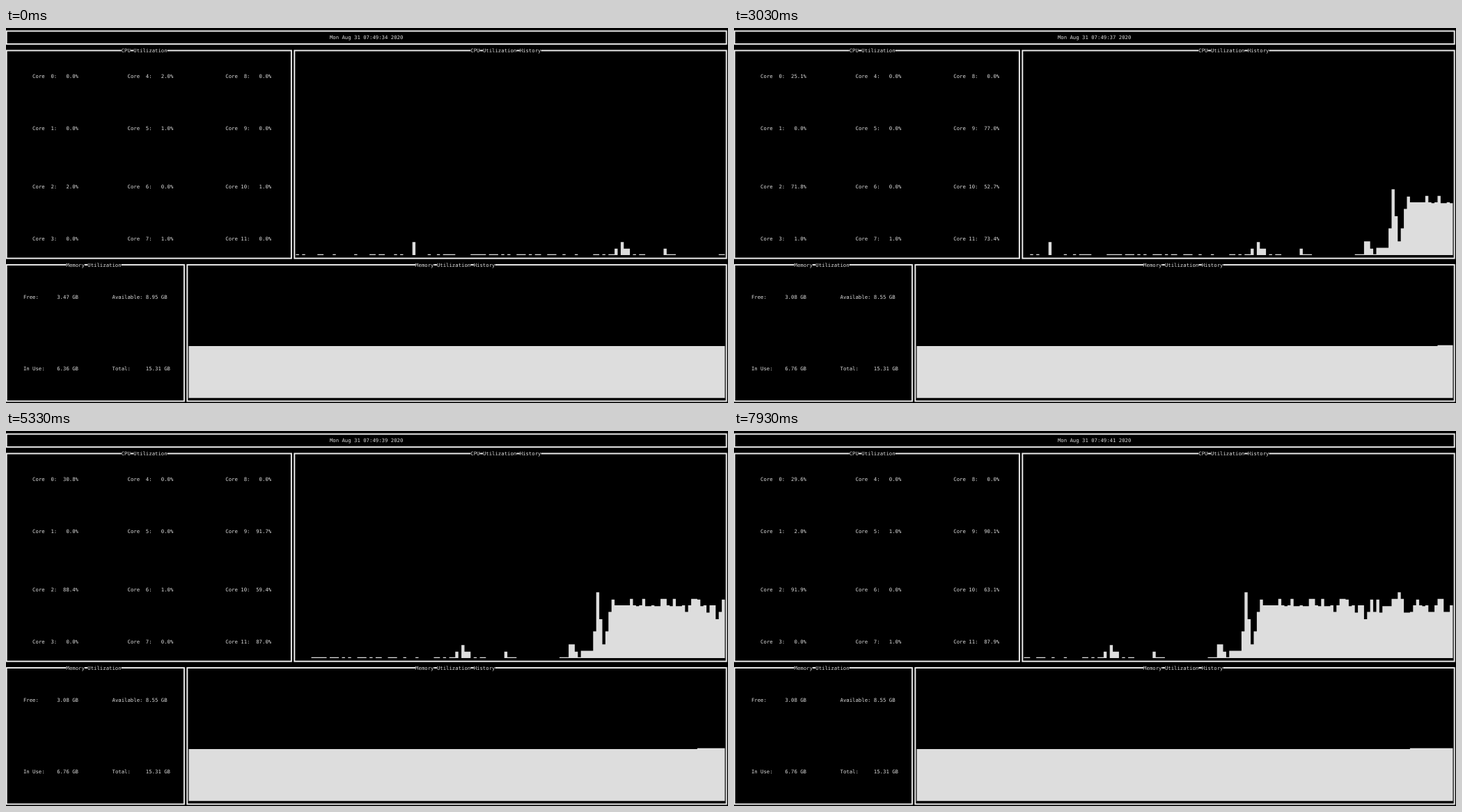
An HTML page for the animation above (8000 ms loop, 1037 px wide and 540 px high).

```html
<!DOCTYPE html>
<html lang="en">
<head>
<meta charset="utf-8">
<title>System monitor</title>
<style>
  html, body { margin: 0; width: 100%; height: 100%; overflow: hidden; background: #000; }
  svg { display: block; width: 1037px; height: 540px; }
  text {
    font: 7.309px "DejaVu Sans Mono", monospace;
    fill: #ddd; white-space: pre; text-rendering: geometricPrecision;
  }
  .border { fill: none; stroke: #e8e8e8; stroke-width: 2; }
  .bars { fill: #ddd; }
</style>
</head>
<body>
<svg id="stage" viewBox="0 0 1037 540"></svg>
<script>
const LOOP = 8000;
const SAMPLE_MS = 100.65;
const STALL = { from: 930, to: 1330 };   // the screen does not refresh here
const CELL_W = 4.4, CELL_H = 9.35;
const LAST_COL = 235, CPU_COL = 95, MEM_COL = 60;
const stage = document.getElementById("stage");

// The terminal grid is slightly cropped at the top left.
const colX = col => col * CELL_W - 1.5;
const rowY = row => row * CELL_H - 0.25;

function random(n, seed = 0) {
  const value = Math.sin(n * 12.9898 + seed * 78.233) * 43758.5453;
  return value - Math.floor(value);
}

function add(tag, attrs, content = "") {
  const node = document.createElementNS("http://www.w3.org/2000/svg", tag);
  for (const key in attrs) node.setAttribute(key, attrs[key]);
  node.textContent = content;
  return stage.appendChild(node);
}

const label = (col, row, content) =>
  add("text", { x: colX(col), y: rowY(row + 0.5) + 2.5 }, content);

function box(left, right, top, bottom) {
  add("rect", {
    class: "border", x: colX(left + 0.5), y: rowY(top + 0.5),
    width: (right - left) * CELL_W, height: (bottom - top) * CELL_H
  });
}

// Title words cover the border; the gaps between them leave it visible.
function title(col, row, content) {
  for (const word of content.split(" ")) {
    add("rect", { x: colX(col), y: rowY(row), width: word.length * CELL_W, height: CELL_H });
    label(col, row, word);
    col += word.length + 1;
  }
}

// CPU load of a sample in terminal rows: idle ticks, a ramp, then a noisy plateau.
const spikes = { 38: 2, 104: 1, 106: 2, 107: 1, 108: 1, 120: 1, 189: 6, 200: 10 };
const ramp = [2, 2, 1, 0, 1, 1, 1, 1, 4, 10, 6, 2, 4, 7, 9];
const RAMP_AT = 141, PLATEAU_AT = RAMP_AT + ramp.length;

function cpuRows(n) {
  if (n < RAMP_AT) {
    const quiet = n > 123 && n < 138;
    const ticking = n > 120 || random(n) < 0.36;
    return spikes[n] || (ticking && !quiet ? 1 / 8 : 0);
  }
  const eighth = random(n, 1) < 0.65 ? 1 / 8 : 0;
  if (n < PLATEAU_AT) return ramp[n - RAMP_AT] + eighth;
  const swing = 0.25 * Math.min(1, (n - PLATEAU_AT) / 30);
  const r = random(n, 2);
  const level = r < swing ? 7 : r > 0.77 ? 9 : 8;
  return (spikes[n] || level) + eighth;
}

// Cores that take up the work, with their load in percent.
const busy = { 0: 28, 2: 90, 9: 91, 10: 61, 11: 87 };

function coreLoad(core, second) {
  const r = random(core + 1, second + 3);
  if (!busy[core] || second < 2) return Math.floor(2.5 * r * r);
  const started = second < 4 ? 0.83 : 1;
  return busy[core] * started + 6 * (r - 0.5);
}

box(0, LAST_COL, 0, 2);
box(0, 93, 3, 35);
box(94, LAST_COL, 3, 35);
box(0, 58, 36, 57);
box(59, LAST_COL, 36, 57);
title(38, 3, "CPU Utilization");
title(152, 3, "CPU Utilization History");
title(20, 36, "Memory Utilization");
title(134, 36, "Memory Utilization History");

const clock = label(106, 1);
const cores = Array.from({ length: 12 }, (_, i) =>
  label([9, 40, 72][Math.floor(i / 4)], [7, 15, 24, 32][i % 4]));
const free = label(6, 41);
const available = label(35, 41);
const inUse = label(6, 52);
label(35, 52, "Total:     15.31 GB");
const cpuBars = add("path", { class: "bars" });
const memBars = add("path", { class: "bars" });

function barPath(firstCol, baseRow, rowsAt) {
  let d = `M${colX(firstCol)} ${rowY(baseRow)}`;
  for (let col = firstCol; col < LAST_COL; col++) {
    d += `V${rowY(baseRow - rowsAt(col)).toFixed(2)}H${colX(col + 1).toFixed(2)}`;
  }
  return d + `V${rowY(baseRow)}Z`;
}

let shown = -1;

function render(time) {
  const stalled = time >= STALL.from && time < STALL.to;
  const shift = Math.floor((stalled ? STALL.from : time) / SAMPLE_MS);
  if (shift === shown) return;
  shown = shift;

  const second = Math.floor((shift + 1) / 10);
  const raised = Math.floor((shift + 1) / 5) - 1;
  const taken = 0.396 * (1 - 0.09 ** second);

  clock.textContent = `Mon Aug 31 07:49:${34 + second} 2020`;
  cores.forEach((node, i) => {
    const load = coreLoad(i, second).toFixed(1);
    node.textContent = `Core ${String(i).padStart(2)}: ${load.padStart(5)}%`;
  });
  free.textContent = `Free:      ${(3.474 - taken).toFixed(2)} GB`;
  available.textContent = `Available: ${(8.949 - taken).toFixed(2)} GB`;
  inUse.textContent = `In Use:    ${(6.361 + taken).toFixed(2)} GB`;

  cpuBars.setAttribute("d", barPath(CPU_COL, 35, col => cpuRows(col - CPU_COL + shift)));
  memBars.setAttribute("d", barPath(MEM_COL, 57, col => col < LAST_COL - raised ? 8 : 8 + 1 / 8));
}

const start = performance.now();
function loop() {
  render((performance.now() - start) % LOOP);
  requestAnimationFrame(loop);
}
loop();
</script>
</body>
</html>
```
